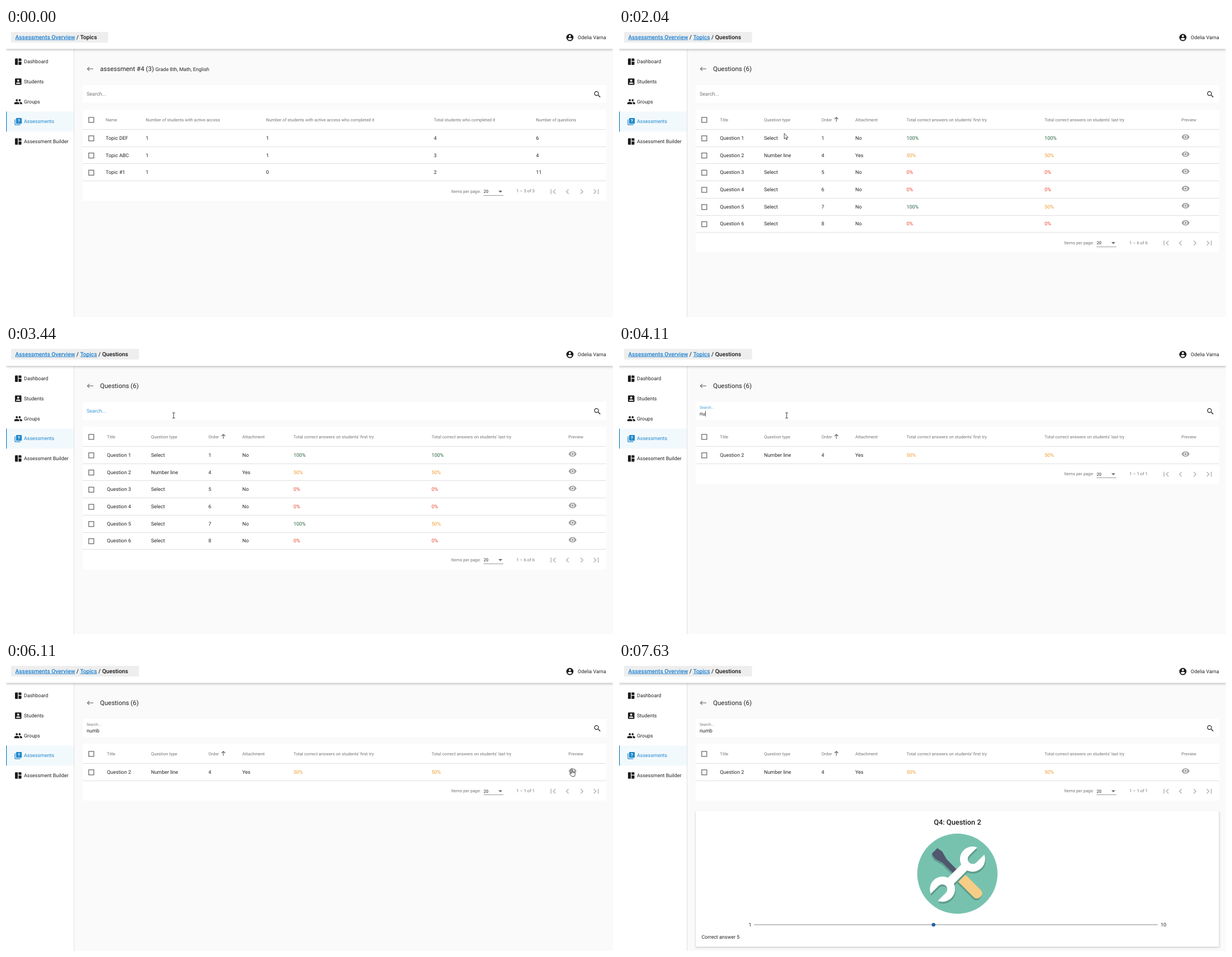
Animation of 1084 by 517 pixels, one loop 7970 ms. Source, as an HTML page with a canvas:

```html
<!DOCTYPE html>
<html lang="en">
<head>
<meta charset="utf-8">
<title>Assessments</title>
<style>
html, body { margin: 0; width: 100%; height: 100%; overflow: hidden; background: #fafafa; }
canvas { display: block; width: 1084px; height: 517px; }
</style>
</head>
<body>
<canvas id="stage"></canvas>
<script>
const W = 1084, H = 517, LOOP = 7970;
const UI = 0.64; // page zoom
const canvas = document.getElementById('stage');
const ctx = canvas.getContext('2d');
const ratio = window.devicePixelRatio || 1;
canvas.width = W * ratio;
canvas.height = H * ratio;

const INK = '#242424', GREY = '#757575', BLUE = '#2088cb', LINE = '#dfdfdf';
const GREEN = '#28623f', ORANGE = '#f29a2e', RED = '#e8432e';
const BODY = 14 * UI, SMALL = 12 * UI;

const icon = d => new Path2D(d);
const ICONS = {
  board: icon('M11 21H5c-1.1 0-2-.9-2-2V5c0-1.1.9-2 2-2h6v18zm2 0h6c1.1 0 2-.9 2-2v-7h-8v9zm8-11V5c0-1.1-.9-2-2-2h-6v7h8z'),
  student: icon('M3 5v14c0 1.1.9 2 2 2h14c1.1 0 2-.9 2-2V5c0-1.1-.9-2-2-2H5c-1.1 0-2 .9-2 2zm12 4a3 3 0 1 1-6 0 3 3 0 0 1 6 0zm-9 8c0-2 4-3.1 6-3.1s6 1.1 6 3.1v1H6z'),
  group: icon('M16 11a3 3 0 1 0 0-6 3 3 0 0 0 0 6zm-8 0a3 3 0 1 0 0-6 3 3 0 0 0 0 6zm0 2c-2.3 0-7 1.2-7 3.5V19h14v-2.5C15 14.200 10.300 13 8 13zm8 0l-1 .05c1.200.84 2 2 2 3.450V19h6v-2.500c0-2.300-4.700-3.500-7-3.500z'),
  quiz: icon('M4 6H2v14c0 1.1.9 2 2 2h14v-2H4zM20 2H8c-1.1 0-2 .9-2 2v12c0 1.1.9 2 2 2h12c1.1 0 2-.9 2-2V4c0-1.1-.9-2-2-2z'),
  user: icon('M12 2a10 10 0 1 0 0 20 10 10 0 0 0 0-20zm0 3a3 3 0 1 1 0 6 3 3 0 0 1 0-6zm0 14.2c-2.5 0-4.7-1.3-6-3.2 0-2 4-3.1 6-3.1s6 1.1 6 3.1c-1.3 1.9-3.5 3.2-6 3.2z'),
  search: icon('M15.5 14h-.8l-.3-.3A6.5 6.5 0 1 0 13.700 14.400l.3.3v.8l5 5 1.500-1.500zm-6 0a4.500 4.500 0 1 1 0-9 4.500 4.500 0 0 1 0 9z'),
  eye: icon('M12 4.5C7 4.5 2.7 7.6 1 12c1.7 4.4 6 7.5 11 7.5s9.3-3.1 11-7.5c-1.7-4.4-6-7.5-11-7.5zM12 17a5 5 0 1 1 0-10 5 5 0 0 1 0 10zm0-8a3 3 0 1 0 0 6 3 3 0 0 0 0-6z'),
  back: icon('M21 11H6.800l3.600-3.600L9 6l-6 6 6 6 1.400-1.400L6.800 13H21z'),
  first: icon('M18.400 16.600L13.800 12l4.600-4.600L17 6l-6 6 6 6zM6 6h2v12H6z'),
  prev: icon('M15.400 7.400L14 6l-6 6 6 6 1.400-1.400L10.800 12z'),
  next: icon('M10 6L8.600 7.400 13.200 12l-4.600 4.600L10 18l6-6z'),
  last: icon('M5.600 7.400L10.200 12l-4.600 4.600L7 18l6-6-6-6zM16 6h2v12h-2z')
};
const ARROW = icon('M0 0V10l2.300-2.100 1.600 3.400 1.500-.7-1.600-3.300h3.200z');
const HAND = icon('M-.9 9V1q0-1 1-1t1 1v4.500l3.500.7q1.400.3 1.400 1.500v2.500l-1 3.500h-5l-3.500-4.600q-.6-1 .2-1.400 1-.3 1.700.600z');

const MENU = [['Dashboard', 'board'], ['Students', 'student'], ['Groups', 'group'],
  ['Assessments', 'quiz'], ['Assessment Builder', 'board']];

const TOPICS = {
  cols: [178, 249.5, 464.5, 764, 946.5],
  heads: ['Name', 'Number of students with active access',
    'Number of students with active access who completed it',
    'Total students who completed it', 'Number of questions'],
  rows: [['Topic DEF', '1', '1', '4', '6'], ['Topic ABC', '1', '1', '3', '4'],
    ['Topic #1', '1', '0', '2', '11']]
};
const QUESTIONS = {
  cols: [180.3, 259, 361.5, 422, 513.5, 760, 1004.3],
  heads: ['Title', 'Question type', 'Order', 'Attachment',
    "Total correct answers on students' first try",
    "Total correct answers on students' last try", 'Preview'],
  rows: [['Question 1', 'Select', '1', 'No', '100%', '100%'],
    ['Question 2', 'Number line', '4', 'Yes', '50%', '50%'],
    ['Question 3', 'Select', '5', 'No', '0%', '0%'],
    ['Question 4', 'Select', '6', 'No', '0%', '0%'],
    ['Question 5', 'Select', '7', 'No', '100%', '50%'],
    ['Question 6', 'Select', '8', 'No', '0%', '0%']],
  preview: true
};
const SCORE = { '100%': GREEN, '50%': ORANGE, '0%': RED };

// Event times in ms
const OPEN = 1580, LOADED = 1970, FOCUS = 3440, FILTER = 4110, BLUR = 6110, PREVIEW = 6230;
const KEYS = [3830, 4040, 4320, 4650];

// Pointer trips: [time, x, y]
const TRIPS = [
  [[200, 902, 490], [330, 790, 432], [460, 600, 352], [590, 420, 285], [720, 300, 240],
    [850, 264, 214], [980, 290, 205], [1050, 291, 203], [1300, 294.3, 193.3],
    [1970, 294.3, 193.3], [2200, 297, 178], [2500, 301, 146], [2760, 302, 133],
    [2820, 302, 137], [2950, 303, 154], [3150, 301, 142], [3350, 299.5, 126],
    [5050, 299.5, 126], [5180, 315, 145], [5320, 350, 180], [5450, 403, 202.5],
    [5560, 600, 214], [5670, 850, 210], [5780, 1024, 200], [5900, 1014, 193],
    [6000, 1010.3, 191], [7370, 1010.3, 191], [7440, 1020, 245], [7510, 1035, 340],
    [7570, 1048, 430], [7630, 1060, 502]]
][0];

function box(x, y, w, h, color) {
  ctx.fillStyle = color;
  ctx.fillRect(x, y, w, h);
}

// y is the middle of the capitals; returns the right end
function text(str, x, y, size = BODY, color = INK, weight = 400, align = 'left') {
  ctx.font = `${weight} ${size}px Roboto, sans-serif`;
  ctx.textAlign = align;
  ctx.fillStyle = color;
  ctx.fillText(str, x, y + size * 0.355);
  return x + ctx.measureText(str).width;
}

function glyph(name, cx, cy, color, scale = UI) {
  ctx.save();
  ctx.translate(cx, cy);
  ctx.scale(scale, scale);
  ctx.translate(-12, -12);
  ctx.fillStyle = color;
  ctx.fill(ICONS[name], name === 'group' || name === 'quiz' ? 'nonzero' : 'evenodd');
  ctx.restore();
}

function poly(points, color) {
  ctx.beginPath();
  points.forEach(p => ctx.lineTo(p[0], p[1]));
  ctx.closePath();
  ctx.fillStyle = color;
  ctx.fill();
}

function shadowed(x, y, w, h, blur, dy, alpha) {
  ctx.save();
  ctx.shadowColor = `rgba(0,0,0,${alpha})`;
  ctx.shadowBlur = blur * ratio;
  ctx.shadowOffsetY = dy * ratio;
  box(x, y, w, h, '#fff');
  ctx.restore();
}

function breadcrumb(deep) {
  box(9, 7, deep ? 228.5 : 173.5, 19, '#eee');
  const crumbs = deep ? ['Assessments Overview', 'Topics', 'Questions'] : ['Assessments Overview', 'Topics'];
  const size = 16 * UI;
  let x = 16.5;
  crumbs.forEach((name, i) => {
    const end = i === crumbs.length - 1;
    const right = text(name, x, 16.3, size, end ? '#111' : '#1a7fd0', 500);
    if (!end) {
      box(x, 20.6, right - x, 0.9, '#1a7fd0');
      x = text(' / ', right, 16.3, size, INK, 500);
    }
  });
}

function frame(deep) {
  box(0, 0, W, H, '#fafafa');
  box(0, 38, 121, H, '#fff');
  box(121, 38, 1, H, '#e0e0e0');
  shadowed(0, 0, W, 37.5, 4, 1, 0.28);
  breadcrumb(deep);
  glyph('user', 1007, 17, '#1c1c1c');
  text('Odelia Varna', 1021, 16.8);
  box(0, 149.5, 121, 35.8, '#f2f9fd');
  box(0, 149.5, 1.3, 35.8, BLUE);
  MENU.forEach(([name, sign], i) => {
    const y = 60 + i * 35.7, color = sign === 'quiz' ? BLUE : INK;
    glyph(sign, 21.8, y + 0.3, sign === 'quiz' ? BLUE : '#1c1c1c');
    if (sign === 'quiz') text('?', 23.1, y - 0.9, 8, '#fff', 700, 'center');
    text(name, 32, y, BODY, color);
  });
}

function heading(deep, count) {
  glyph('back', 150.2, 73.2, GREY);
  const right = text(deep ? `Questions (${count})` : 'assessment #4 (3)', 168, 73, 18 * UI);
  if (!deep) text('Grade 8th, Math, English', right + 2.6, 73.4);
}

function mix(a, b, k) {
  return a + (b - a) * k;
}

function searchBar(t) {
  box(137, 102, 934.5, 32, '#fff');
  glyph('search', 1056.2, 118.8, '#1c1c1c');
  const p = Math.min(1, Math.max(0, (t - FOCUS) / 120));
  const k = 1 - (1 - p) ** 2;
  const color = t >= FOCUS && t < BLUR ? '#3a9ad6' : GREY;
  text('Search...', 144, mix(118.2, 111.7, k), mix(BODY, BODY * 0.75, k), color);
  const typed = 'numb'.slice(0, KEYS.filter(at => t >= at).length);
  const right = text(typed, 144, 122.9);
  if (t >= FOCUS + 60 && t < KEYS[2]) box(right + 0.2, 118, 0.8, 10, '#333');
}

function checkbox(y) {
  ctx.strokeStyle = '#696969';
  ctx.lineWidth = 2 * UI;
  ctx.strokeRect(147.8, y - 4.5, 9, 9);
}

function sortArrow(x, y) {
  ctx.strokeStyle = '#666';
  ctx.lineWidth = 1.2;
  ctx.beginPath();
  ctx.moveTo(x, y + 4.3);
  ctx.lineTo(x, y - 3.5);
  ctx.moveTo(x - 3.2, y - 0.5);
  ctx.lineTo(x, y - 3.7);
  ctx.lineTo(x + 3.2, y - 0.5);
  ctx.stroke();
}

function table(data, rows) {
  const step = 48 * UI, top = 181.4, end = top + step * rows.length;
  box(137, 146.5, 934.5, end + 35.8 - 146.5, '#fff');
  checkbox(164.4);
  data.heads.forEach((head, i) => text(head, data.cols[i], 164, SMALL, GREY));
  if (data.preview) sortArrow(388.2, 163.5);
  box(137, Math.floor(top), 934.5, 1, LINE);
  rows.forEach((row, r) => {
    const y = top + step * r + 15.2;
    checkbox(y + 0.8);
    row.forEach((cell, i) => text(cell, data.cols[i], y, BODY, SCORE[cell] || INK));
    if (data.preview) glyph('eye', 1011.8, y - 1.6, '#a0a0a0');
    box(137, Math.floor(top + step * (r + 1)), 934.5, 1, LINE);
  });
  paginator(end + 18.6, rows.length);
}

function paginator(y, n) {
  text('Items per page:', 795, y, SMALL, GREY);
  text('20', 853, y + 0.2, SMALL);
  poly([[879.3, y - 1.2], [886.3, y - 1.2], [882.8, y + 2.3]], '#666');
  box(852.8, Math.floor(y + 7.2), 35.4, 1, '#999');
  text(n ? `1 – ${n} of ${n}` : '0 of 0', 911.5, y - 0.4, SMALL, GREY);
  ['first', 'prev', 'next', 'last'].forEach((name, i) =>
    glyph(name, 977.1 + i * 25.6, y + 0.5, '#b4b4b4', UI * 28 / 24));
}

function wrenchHead(x, angle) {
  const R = 22.5, slot = 9, a = Math.asin(slot / R);
  ctx.save();
  ctx.translate(x, 0);
  ctx.rotate(angle);
  ctx.beginPath();
  ctx.arc(0, 0, R, a, Math.PI * 2 - a);
  ctx.arc(0.5, 0, slot, -Math.PI / 2, Math.PI / 2, true);
  ctx.closePath();
  ctx.fill();
  ctx.restore();
}

function wrench(dx, dy, color) {
  ctx.save();
  ctx.translate(604.5 + dx, 379.5 + dy);
  ctx.rotate(-Math.PI / 4);
  ctx.fillStyle = color;
  ctx.fillRect(-24, -7.5, 48, 15);
  wrenchHead(38, 0);
  wrenchHead(-38, Math.PI);
  ctx.restore();
}

function screwdriver(dx, dy, blade, grip) {
  ctx.save();
  ctx.translate(604.5 + dx, 379 + dy);
  ctx.rotate(Math.PI / 4);
  poly([[-58, -7], [-48, -9], [-32, -4.8], [0, -4.5], [0, 4.5], [-32, 4.8], [-48, 9], [-58, 7]], blade);
  ctx.fillStyle = grip;
  ctx.beginPath();
  ctx.roundRect(4, -9, 54, 18, [0, 8, 8, 0]);
  ctx.fill();
  ctx.restore();
}

function tools() {
  const shade = '#5f9d8d';
  ctx.save();
  ctx.beginPath();
  ctx.arc(604.3, 378.8, 71.7, 0, Math.PI * 2);
  ctx.fillStyle = '#77c2ae';
  ctx.fill();
  ctx.clip();
  screwdriver(-1, 3.5, shade, shade);
  screwdriver(0, 0, '#50576f', '#f5cd86');
  wrench(1, 3.5, shade);
  wrench(0, 0, '#fff');
  ctx.restore();
}

function previewCard() {
  shadowed(137, 266.5, 934.5, 243, 3, 1, 0.25);
  text('Q4: Question 2', 604.4, 286.4, 20 * UI, '#1c1c1c', 500, 'center');
  tools();
  text('1', 231.5, 469.6);
  text('10', 967.3, 469.6);
  box(241, 469.4, 721, 1.2, '#9a9a9a');
  ctx.beginPath();
  ctx.arc(561.7, 470, 3.3, 0, Math.PI * 2);
  ctx.fillStyle = '#2163a5';
  ctx.fill();
  text('Correct answer 5', 147.5, 492.3);
}

function pointerAt(t) {
  const i = TRIPS.findIndex(k => k[0] > t);
  if (i < 1) return null;
  const [t0, x0, y0] = TRIPS[i - 1], [t1, x1, y1] = TRIPS[i];
  const k = (t - t0) / (t1 - t0);
  return [mix(x0, x1, k), mix(y0, y1, k)];
}

function pointer(t) {
  const at = pointerAt(t);
  if (!at) return;
  const [x, y] = at;
  const overRow = t < OPEN && y > 181 && y < 273;
  const overEye = t > OPEN && Math.hypot(x - 1012, y - 195) < 8;
  ctx.save();
  ctx.translate(x, y);
  ctx.strokeStyle = '#333';
  ctx.lineWidth = 0.9;
  if (y > 102 && y < 132) {
    ctx.beginPath();
    for (const s of [-1, 1]) {
      ctx.moveTo(-2.4, s * 4.7);
      ctx.lineTo(2.4, s * 4.7);
    }
    ctx.moveTo(0, -4.7);
    ctx.lineTo(0, 4.7);
    ctx.stroke();
  } else {
    const hand = overRow || overEye, shape = hand ? HAND : ARROW;
    ctx.fillStyle = '#fff';
    ctx.fill(shape);
    ctx.stroke(shape);
    if (hand) {
      ctx.lineWidth = 0.6;
      ctx.stroke(new Path2D('M1.100 5.500v2.500M2.800 6v2M4.400 6.300v2'));
    }
  }
  ctx.restore();
}

function draw(t) {
  ctx.setTransform(ratio, 0, 0, ratio, 0, 0);
  ctx.textRendering = 'geometricPrecision';
  const deep = t >= OPEN;
  frame(deep);
  heading(deep, t >= LOADED ? 6 : 0);
  searchBar(t);
  if (!deep) table(TOPICS, TOPICS.rows);
  else if (t < LOADED) table(QUESTIONS, []);
  else table(QUESTIONS, t < FILTER ? QUESTIONS.rows : [QUESTIONS.rows[1]]);
  if (t >= PREVIEW) previewCard();
  pointer(t);
}

const start = performance.now();
function tick() {
  draw((performance.now() - start) % LOOP);
  requestAnimationFrame(tick);
}
tick();
</script>
</body>
</html>
```
